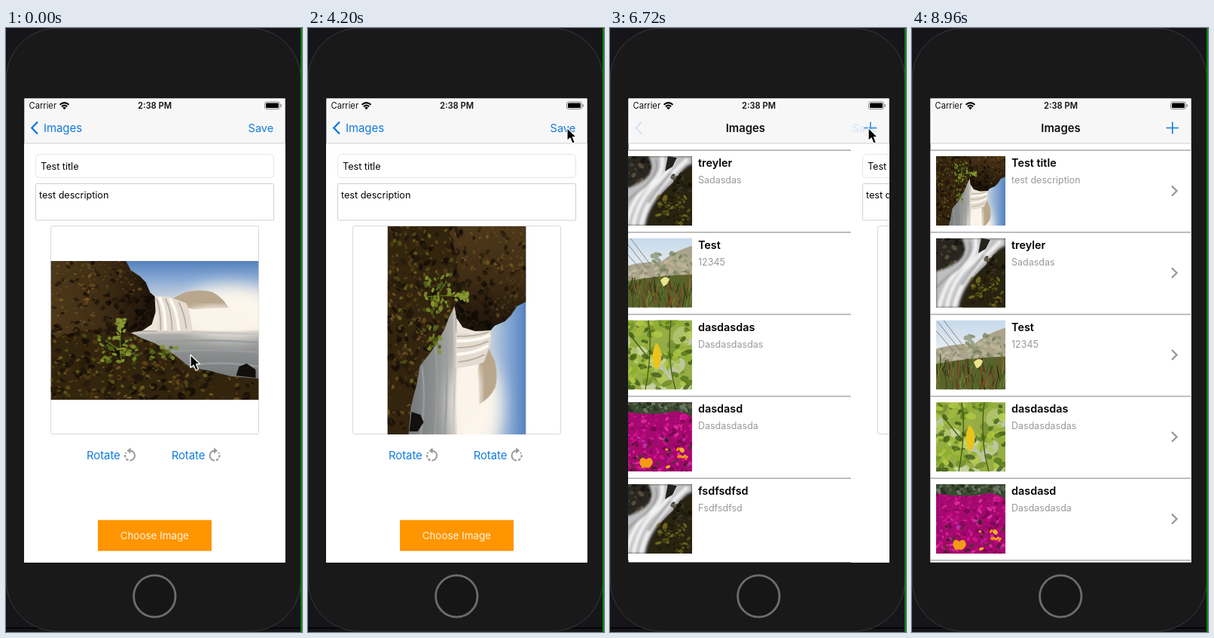
Animation of 393x801 px, one loop 9030 ms. Source, as an HTML page:

```html
<!DOCTYPE html>
<html lang="en">
<head>
<meta charset="utf-8">
<title>Image list</title>
<style>
html, body { margin: 0; width: 100%; height: 100%; overflow: hidden; background: #16161a; }
svg { display: block; width: 393px; height: 801px; font-family: Inter, "Open Sans", sans-serif; }
</style>
</head>
<body>
<svg id="stage" viewBox="0 0 393 801" xmlns="http://www.w3.org/2000/svg"></svg>
<script>
const LOOP = 9030, STEP = 70, PITCH = 108.75, TOP = 162, BLUE = '#117be0';

// Seeded random numbers keep the textures the same on every load.
let seed = 7;
const rnd = () => (seed = (seed * 16807) % 2147483647) / 2147483647;
const between = (a, b) => a + rnd() * (b - a);
const pick = list => list[Math.floor(rnd() * list.length)];

const text = (x, y, size, str, fill = '#000', extra = '') =>
  `<text x="${x}" y="${y}" font-size="${size}" fill="${fill}" ${extra}>${str}</text>`;
const rect = (x, y, w, h, fill, extra = '') =>
  `<rect x="${x}" y="${y}" width="${w}" height="${h}" fill="${fill}" ${extra}/>`;
const shape = (d, fill, extra = '') => `<path d="${d}" fill="${fill}" ${extra}/>`;
const line = (d, color, width, extra = '') =>
  `<path d="${d}" fill="none" stroke="${color}" stroke-width="${width}" ${extra}/>`;
const stops = list => list.map((c, i) =>
  `<stop offset="${i / (list.length - 1)}" stop-color="${c}"/>`).join('');
const ramp = (id, list, dir = 'x2="0" y2="1"') =>
  `<linearGradient id="${id}" ${dir}>${stops(list)}</linearGradient>`;
const clip = (id, inner) => `<clipPath id="${id}">${inner}</clipPath>`;
const blur = (id, size) => `<filter id="${id}"><feGaussianBlur stdDeviation="${size}"/></filter>`;
const soft = (inner, id = 'soft') => `<g filter="url(#${id})">${inner}</g>`;

function spots(n, x, y, w, h, r, colors, alpha = 0.75) {
  let out = '';
  for (let i = 0; i < n; i++) {
    const px = between(x, x + w).toFixed(1), py = between(y, y + h).toFixed(1);
    const rx = between(r * 0.4, r), ry = rx * between(0.4, 0.8);
    out += `<ellipse cx="${px}" cy="${py}" rx="${rx.toFixed(1)}" ry="${ry.toFixed(1)}" fill="${pick(colors)}" transform="rotate(${Math.round(between(-60, 60))} ${px} ${py})"/>`;
  }
  return `<g opacity="${alpha}">${out}</g>`;
}

function blades(n, y0, y1, len, colors, width = 1.2) {
  let out = '';
  for (let i = 0; i < n; i++) {
    const x = between(-4, 96), y = between(y0, y1);
    out += line(`M${x.toFixed(1)} ${y.toFixed(1)}l${between(-6, 6).toFixed(1)} ${(-between(0.5, 1) * len).toFixed(1)}`, pick(colors), width);
  }
  return out;
}

// Waterfall landscape, 276 x 184
const CLIFF = 'M0 0H100L106 12L118 20L126 28L132 42L138 47L139 68L134 84L122 92L100 96L70 112H0Z';
const SHORE = 'M0 104L40 92L70 98L102 93L120 102L138 109L165 125L185 141L212 146L240 153L276 156V184H0Z';
const GOLD = ['#6e501f', '#84622b', '#594018', '#493412'];
const DARK = ['#0f0a05', '#1b1209', '#251a0c'];
const MOSS = ['#5b5a17', '#6b6a1d', '#474a13', '#7c7126'];
function landscape() {
  return rect(0, 0, 276, 94, 'url(#sky)') +
    rect(90, 92, 186, 92, 'url(#lake)') +
    soft('<ellipse cx="238" cy="66" rx="64" ry="34" fill="#fdf6ec"/>', 'mist') +
    soft(shape('M150 56Q168 46 180 41Q200 37 214 41Q228 48 236 62L190 64Z', '#b9a78d')) +
    soft('<ellipse cx="218" cy="76" rx="46" ry="16" fill="#fbf4ea"/>', 'haze2') +
    soft(shape('M136 46L156 47L180 56Q186 70 188 94H141L143 70Z', '#e4dcd0') +
      line('M144 48Q152 62 152 92M158 50Q168 66 170 92', '#fdfaf4', 4) +
      line('M140 50Q146 64 146 92M152 50Q161 66 161 92M170 55Q178 70 180 90', '#b3a99c', 1.6)) +
    soft(line('M104 96Q170 93 276 97', '#c9c6c0', 3) +
      line('M140 107Q210 103 276 108M160 120Q220 116 276 121M186 138Q230 132 276 140', '#989c9c', 2.4)) +
    shape(CLIFF, 'url(#rock)') +
    `<g clip-path="url(#cliff)">` + soft(
      spots(130, 0, 0, 140, 112, 4, DARK) +
      spots(60, 0, 6, 60, 90, 3, GOLD) +
      spots(40, 50, 0, 72, 44, 3, GOLD, 0.6) +
      spots(45, 0, 0, 110, 30, 3, MOSS, 0.35) +
      spots(70, 66, 44, 74, 52, 5, DARK, 0.85) +
      spots(30, 0, 86, 110, 24, 6, DARK)) + '</g>' +
    shape(SHORE, '#33240e') +
    `<g clip-path="url(#shore)">` + soft(
      spots(120, 0, 92, 276, 92, 7, DARK) +
      spots(150, 0, 92, 276, 92, 4, GOLD, 0.7) +
      spots(100, 0, 98, 220, 80, 3.5, MOSS) +
      spots(60, 0, 92, 276, 92, 4, DARK)) + '</g>' +
    shape('M246 152L250 140L260 136L272 144L272 155Z', '#120f0c') +
    line('M94 134Q90 110 94 78M92 118L76 108M94 112L108 102M93 126L112 122', '#556c1a', 1.5) +
    spots(44, 64, 100, 50, 34, 4, ['#6f8a22', '#8ca030', '#4d661a', '#7a932a'], 0.9) +
    spots(9, 84, 76, 18, 22, 5, ['#8fa234', '#6f8a26'], 0.9) +
    spots(22, 132, 111, 36, 18, 4, ['#6a7f1f', '#7f922b', '#4e5f18'], 0.85);
}

// Small photos, 92 x 92
function stream() {
  return rect(0, 0, 92, 92, '#2a2620') +
    soft(spots(70, 0, 0, 92, 50, 5, ['#11100e', '#4d4538', '#635a45', '#1e1b16'])) +
    soft(shape('M34 0H92V10Q80 14 72 30Q58 42 44 58Q32 76 30 92H0V44Q18 40 30 30Q44 18 34 0Z', '#bfbfc1') +
      line('M52 0Q56 20 40 34Q14 50 4 92M70 2Q58 26 40 40Q20 60 14 92M86 4Q64 24 48 44Q30 64 24 92', '#f2f2f3', 5) +
      line('M44 4Q50 20 30 40Q10 54 0 66M64 22Q44 46 34 62', '#8f9092', 2.5), 'flow') +
    shape('M60 0L72 2L66 14L56 20Z', '#24221d') +
    shape('M92 14L76 22L66 36L50 52L38 74L34 92H92Z', '#292411') +
    soft(spots(30, 66, 22, 30, 30, 4, ['#0f0d09', '#3f3720', '#1f1b12']) +
      spots(70, 46, 54, 44, 36, 4, ['#6b6419', '#4c4a12', '#857b22', '#1e1a0a']));
}
function dune() {
  return rect(0, 0, 92, 92, 'url(#haze)') +
    shape('M0 38Q30 30 50 32Q66 18 92 10V70H0Z', '#a9a48b') +
    soft(spots(50, 40, 20, 56, 30, 5, ['#87916c', '#c3b89a', '#707b55']) +
      spots(24, 0, 38, 50, 14, 5, ['#c8bea4', '#969278'])) +
    shape('M0 58Q40 50 92 48V92H0Z', '#58632b') +
    blades(130, 66, 98, 22, ['#38511c', '#7c8c3a', '#6a3a22', '#8a4a2a', '#4f6a25', '#25320f'], 1) +
    line('M2 2L32 40M10 0L36 34M0 14L24 42', '#6c6e66', 0.8) +
    shape('M50 56Q56 48 62 54Q60 62 54 64Z', '#e8e58c');
}
function leaves() {
  return rect(0, 0, 92, 92, '#96ad45') +
    soft(spots(30, 0, 0, 92, 92, 13, ['#d5dfb5', '#b7c97a', '#c9cfc0', '#6f8c2a'])) +
    soft(spots(110, 0, 0, 92, 92, 7, ['#4f7417', '#8db02b', '#b3cc45', '#385613', '#a2bd3a'])) +
    line('M34 0Q40 40 30 92M64 0Q58 50 70 92M10 20L34 50', '#435c18', 1.3) +
    shape('M44 30Q54 38 50 58Q46 68 42 62Q36 48 44 30Z', '#e9c41c');
}
function flowers() {
  return rect(0, 0, 92, 92, '#a3096e') +
    spots(200, 0, 14, 92, 78, 4, ['#d4128f', '#c00d80', '#e32da0', '#780750', '#ab0b74'], 0.9) +
    spots(50, 0, 44, 92, 46, 3, ['#33421c', '#1f2a14', '#b33ec0']) +
    shape('M0 0H92V20Q76 8 60 14Q30 18 0 12Z', '#3a4a31') +
    soft(spots(40, 0, 0, 92, 12, 4, ['#1e2a1a', '#5d6c4c', '#7c8775'])) +
    shape('M22 80Q24 70 31 76Q38 70 40 80Q36 90 30 86Q25 90 22 80Z', '#f59a14') +
    spots(8, 48, 62, 44, 26, 4, ['#f2920f', '#f7ae2b'], 1);
}

const rows = [
  ['Test title', 'test description', 'turned'],
  ['treyler', 'Sadasdas', 'stream'],
  ['Test', '12345', 'dune'],
  ['dasdasdas', 'Dasdasdasdas', 'leaves'],
  ['dasdasd', 'Dasdasdasda', 'flowers'],
  ['fsdfsdfsd', 'Fsdfsdfsd', 'stream']
];
const row = ([title, note, pic], i) => `<g id="row${i}">` +
  rect(24, 0, 347, PITCH, '#fff') + rect(24, -0.6, 347, 1.6, '#aeaeae') +
  `<g transform="translate(32 8)" clip-path="url(#thumb)"><use href="#${pic}"/></g>` +
  text(132, 22, 14.4, title, '#000', 'font-weight="600"') +
  text(132, 44, 12.5, note, '#999') +
  line('M345 47.5L351.5 54L345 60.5', '#9a9a9a', 2.4) + '</g>';

const rotateIcon = (x, flip) => `<g transform="translate(${x} 567) scale(${flip} 1)">` +
  line('M0 -6.5A6.5 6.5 0 0 1 0 6.5', '#999', 2) +
  line('M-2 6.2A6.5 6.5 0 0 1 -5 -4.2', '#999', 2, 'stroke-dasharray="3.6 1.8"') +
  shape('M1 -10.5V-2.5L-4 -6.5Z', '#999') + '</g>';

const box = (x, y, w, h, color, r) => rect(x, y, w, h, 'none', `stroke="${color}" rx="${r}"`);
const detail = () => `<g id="detail">` + rect(24, 153, 347, 556, '#fff') +
  box(39.5, 167.5, 316, 31, '#e6e6e6', 5) + text(46, 188, 12.6, 'Test title') +
  box(39.5, 206.5, 316, 48.5, '#d0d0d0', 1) + text(44, 226, 12.6, 'test description') +
  box(59.5, 262.5, 276, 276, '#d8d8d8', 2) +
  `<g id="photo"><g transform="translate(59.5 309)" clip-path="url(#wide)"><use href="#land"/></g></g>` +
  text(107, 572, 14.8, 'Rotate', BLUE) + rotateIcon(164.5, 1) +
  text(219.7, 572, 14.8, 'Rotate', BLUE) + rotateIcon(277, -1) +
  rect(122, 652.5, 151, 41, '#ff9500') +
  text(197.3, 678, 13.4, 'Choose Image', '#fff4e0', 'text-anchor="middle"') + '</g>';

const header = () => rect(24, 93, 347, 60, '#f7f7f7') + rect(24, 152.5, 347, 1, '#cfcfcf') +
  text(30.5, 107, 11.2, 'Carrier', '#111') +
  line('M71.5 101.8Q77.5 96.4 83.5 101.8M73.8 104.2Q77.5 101 81.2 104.2', '#000', 2) +
  shape('M75 105.6Q77.5 103.9 80 105.6L77.5 108.2Z', '#000') +
  text(197.5, 107, 11.2, '2:38 PM', '#111', 'font-weight="600" text-anchor="middle"') +
  box(343.5, 98, 20, 9.5, '#8a8a8a', 2.5) + rect(345, 99.4, 17, 6.7, '#000', 'rx="1.3"') +
  rect(364.6, 101.2, 1.4, 3.4, '#8a8a8a') +
  `<g id="back">${line('M42 124.5L34.3 132.5L42 140.5', BLUE, 2.4)}</g>` +
  text(75.5, 138, 14.9, 'Images', BLUE, 'id="backText" text-anchor="middle"') +
  text(197.5, 138, 14.9, 'Images', '#111', 'id="title" font-weight="600" text-anchor="middle"') +
  text(355.3, 138, 14.6, 'Save', BLUE, 'id="save" text-anchor="end"') +
  `<g id="plus">${line('M337.5 132.5H354M345.8 124.5V140.5', BLUE, 1.6)}</g>`;

const defs = () => '<defs>' +
  ramp('sky', ['#5582bd', '#86a8d4', '#c3cfdc', '#efe6da', '#efe6da']) +
  ramp('lake', ['#b3b1ad', '#8a8d8d', '#777b7d', '#666b6d']) +
  ramp('rock', ['#4d381a', '#3f2c14', '#1c130a'], '') +
  ramp('haze', ['#c6d9ec', '#eceff0', '#eceff0']) +
  blur('soft', 0.5) + blur('flow', 1.4) + blur('haze2', 5) +
  '<filter id="mist" x="-50%" y="-80%" width="200%" height="260%"><feGaussianBlur stdDeviation="11"/></filter>' +
  clip('screen', rect(24.5, 93.5, 346, 615, '#000')) +
  clip('thumb', rect(0, 0, 92, 92, '#000')) + clip('wide', rect(0, 0, 276, 184, '#000')) +
  clip('cliff', shape(CLIFF, '#000')) + clip('shore', shape(SHORE, '#000')) +
  `<g id="land">${landscape()}</g>` +
  '<g id="turned"><use href="#land" transform="translate(46 46) scale(.5) rotate(90) translate(-138 -92)"/></g>' +
  [stream, dune, leaves, flowers].map(f => `<g id="${f.name}">${f()}</g>`).join('') + '</defs>';

const stage = document.getElementById('stage');
stage.innerHTML = defs() +
  rect(0, 0, 393, 801, '#16161a') + rect(0, 795, 393, 1.5, '#000') +
  rect(0.4, 0.4, 391, 799.6, '#191919', 'rx="67" stroke="#424242" stroke-width=".8"') +
  rect(391, 0, 2, 801, '#0d7f10') +
  '<circle cx="197.3" cy="753.5" r="27.7" fill="#161616" stroke="#6c6c6c" stroke-width="2.8"/>' +
  `<g clip-path="url(#screen)">${rect(24, 93, 347, 616, '#fff')}<g id="list">${rows.map(row).join('')}</g>${detail()}${header()}</g>` +
  `<g id="cursor">${shape('M0 0V17L4 13.4L7 20.6L10.4 19.2L7.4 12.2H12.6Z', '#000', 'stroke="#fff" stroke-width="1.2" stroke-linejoin="round"')}</g>`;

const el = {};
stage.querySelectorAll('[id]').forEach(n => el[n.id] = n);

const phase = (t, start, length) => Math.min(1, Math.max(0, (t - start) / length));
const smooth = p => p * p * (3 - 2 * p);
const easeOut = p => 1 - (1 - p) ** 3;
const move = (node, x, y) => node.setAttribute('transform', `translate(${x.toFixed(2)} ${y.toFixed(2)})`);
const fade = (node, a) => node.setAttribute('opacity', a.toFixed(3));

// Pointer moves: start, length, x, y
const moves = [[700, 700, 255, 567], [3220, 770, 344, 132.5], [6230, 140, 343, 132.5], [6760, 230, 410, 118]];
function pointer(t) {
  let x = 245, y = 433.5;
  for (const [start, length, toX, toY] of moves) {
    const p = smooth(phase(t, start, length));
    x += (toX - x) * p;
    y += (toY - y) * p;
  }
  return [x, y];
}

function draw(t) {
  const pop = easeOut(phase(t, 6530, 400));
  const insert = smooth(phase(t, 7061, 300));

  el.photo.setAttribute('transform', t >= 2940 ? 'rotate(90 197.5 401)' : '');
  move(el.detail, 346 * pop, 0);
  move(el.list, -104 * (1 - pop), 0);
  rows.forEach((_, i) => move(el['row' + i], 0, TOP + PITCH * (i ? i - 1 + insert : 0)));
  fade(el.row0, phase(insert, 0.2, 0.8));

  const slide = 122 * pop;
  move(el.backText, slide, 0);
  move(el.title, slide - 122, 0);
  fade(el.backText, 1 - phase(pop, 0, 0.7));
  fade(el.title, phase(pop, 0.1, 0.7));
  fade(el.back, 1 - pop);
  fade(el.save, 1 - pop);
  fade(el.plus, pop);
  move(el.cursor, ...pointer(t));
}

function tick(now) {
  draw(Math.floor(((now + 0.5) % LOOP) / STEP) * STEP);
  requestAnimationFrame(tick);
}
draw(0);
requestAnimationFrame(tick);
</script>
</body>
</html>
```
